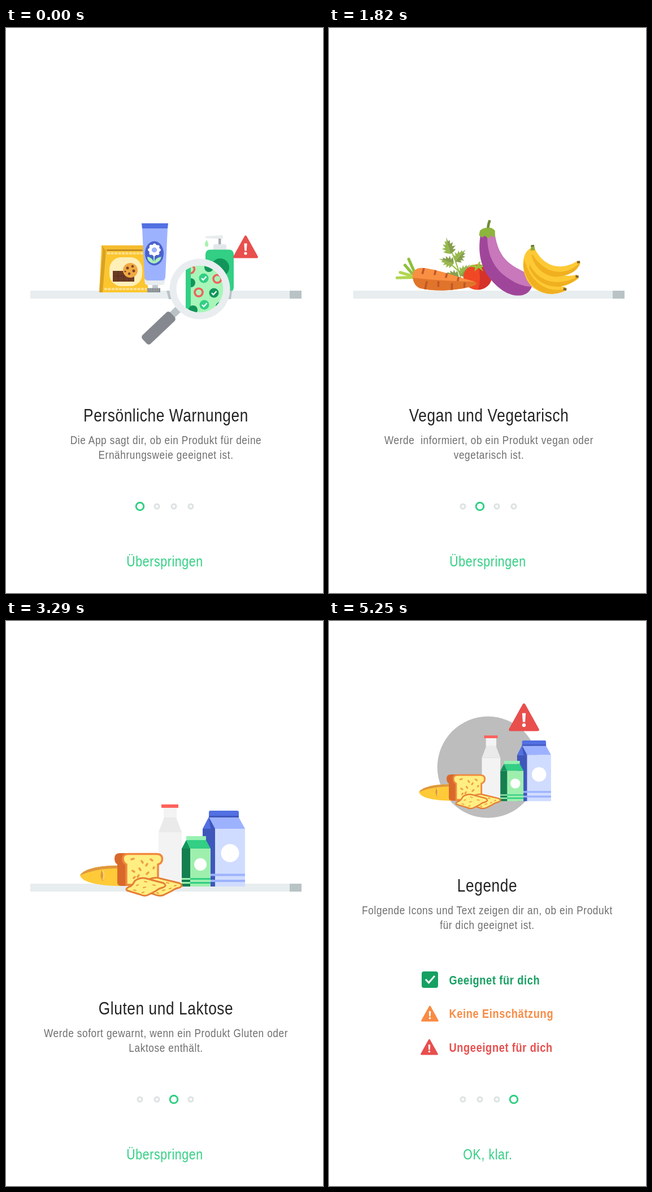
Recreate the animation shown at these times as an HTML page. Size 561 by 998 pixels, loop 6720 ms.

```html
<!DOCTYPE html>
<html lang="de">
<head>
<meta charset="utf-8">
<style>
html, body { margin: 0; width: 100%; height: 100%; overflow: hidden; background: #fff }
svg { display: block; width: 100%; height: 100% }
text { font-family: "Liberation Sans", Arial, sans-serif; white-space: pre; letter-spacing: .75px }
</style>
</head>
<body>
<svg viewBox="0 0 561 998">
<defs>
  <g id="warn">
    <path d="M0-18L20 18H-20Z" fill="currentColor" stroke="currentColor" stroke-width="4" stroke-linejoin="round"/>
    <path d="M-2.6-6H2.6L1.7 7H-1.7Z" fill="#fff"/><circle cy="11.5" r="2.6" fill="#fff"/>
  </g>
  <path id="half" d="M0 0C-4-2-8-3-11-6L-6-7.500L-12-12L-6-12.500L-9-19L-4-17L-4.500-24L-1.500-22L0-30Z"/>
  <g id="leaf"><use href="#half" fill="#96b84c"/><use href="#half" fill="#869f4c" transform="scale(-1 1)"/></g>
  <g id="tick"><circle r="8.5" fill="currentColor"/><path d="M-4 0L-1 3L4.5-3" fill="none" stroke="#fff" stroke-width="2.4"/></g>
  <circle id="ring" r="7" fill="none" stroke="#f2605a" stroke-width="3.6"/>
  <clipPath id="lens"><circle cx="343" cy="461" r="41.5"/></clipPath>
  <clipPath id="tomato"><ellipse cx="276.5" cy="440" rx="24.5" ry="22"/></clipPath>
  <clipPath id="carrot"><path id="carrotShape" d="M162 438C161 427 170 420 182 423C207 427 242 443 267 451Q274 455 268 458C242 465 200 466 173 457Q163 452 162 438Z"/></clipPath>
  <clipPath id="plant"><path id="plantShape" d="M287 360C279 395 283 428 316 457C332 471 354 475 365 464C375 455 373 441 361 432C340 419 315 410 311 360Z"/></clipPath>
</defs>

<g id="shelf"><path d="M43 464H503V478H43Z" fill="#e8edef"/><path d="M502 464H523V478H502Z" fill="#b9c3c6"/></g>

<!-- data-m: slide, pivot x, pivot y, travel x, travel y, turn -->
<g data-m="0 208 426 440 93 60">
  <path d="M169 384H244L252 467H165Z" fill="#fcc62f"/>
  <path d="M169 384L177 393L171 467H165L171 392Z" fill="#d9a224"/>
  <path d="M169 384H243V391H175Z" fill="#f5bc2e"/>
  <path d="M178 392.5H242" stroke="#a87420" stroke-width="2"/>
  <path d="M179 398H243M174 461H249" stroke="#ffe08a" stroke-width="4" stroke-dasharray="5 1.5"/>
  <rect x="183" y="405" width="58" height="51" rx="21" fill="#ffefb8"/>
  <rect x="189" y="429" width="38" height="19" fill="#6b3a24"/>
  <path d="M189 438.5H227M198.5 429V448M208 429V448M217.5 429V448" stroke="#5a2f1e"/>
  <circle cx="220" cy="428" r="13" fill="#f0a844"/>
  <g fill="#7a4526"><circle cx="215" cy="424" r="2.5"/><circle cx="224" cy="421" r="2.2"/><circle cx="226" cy="429" r="2.5"/><circle cx="218" cy="434" r="2.2"/><circle cx="211" cy="430" r="1.5"/></g>
</g>
<g data-m="0 263 404 487 65 100">
  <path d="M259 453H269V461H259Z" fill="#c3cacd"/>
  <path d="M250 459.5H273V467H250Z" fill="#858a90"/><path d="M251 463.3H272" stroke="#a9aeb3" stroke-width="7" stroke-dasharray="1 2"/>
  <path d="M245 444H282L280 452Q279 454 277 454H250Q247 454 246 451Z" fill="#e9edf0"/>
  <path d="M241 353H286L282 440Q281 446 276 446H251Q246 446 245 440Z" fill="#9db2ff"/>
  <path d="M240 345H287L286 354H241Z" fill="#5270e2"/>
  <ellipse cx="262.5" cy="398" rx="16.5" ry="21.5" fill="#4a62cc"/>
  <path d="M262 398V416" stroke="#a9f0b8" stroke-width="2"/>
  <path d="M262 416Q250 414 250 404Q260 405 262 416Q264 405 275 404Q273 414 262 416Z" fill="#a9f0b8"/>
  <g fill="none" stroke="#fff"><circle cx="262.5" cy="392" r="7" stroke-width="5.5"/><circle cx="262.5" cy="392" r="9" stroke-width="5" stroke-linecap="round" stroke-dasharray=".1 6.97"/></g>
  <circle cx="262.5" cy="392" r="4.2" fill="#9db2ff"/>
</g>
<g data-m="0 378 418 542 24 67">
  <path d="M376 371H380.5V384H376Z" fill="#a5acb0"/>
  <path d="M353 368L382 366Q384 366 384 372H371L353 371Z" fill="#e8ecee"/>
  <path d="M367 392V385Q367 382 370 382H387Q390 382 390 385V392Z" fill="#e3e7e9"/>
  <path d="M355 374Q359 381 358 384Q355 390 352 384Q351 381 355 374Z" fill="#a6f2b0"/>
  <rect x="353" y="391.5" width="50" height="75" rx="8" fill="#32cf84"/>
  <circle cx="379" cy="423" r="16" fill="#12955a"/>
</g>
<g data-m="0 424 387 645 -25 210"><use href="#warn" transform="translate(424 386.5)" color="#e84f4d"/></g>
<g data-m="0 343 461 548 -45 65">
  <path d="M309 493L293 508" stroke="#b9c3c6" stroke-width="13"/>
  <rect x="-34" y="-10.5" width="68" height="21" rx="5" fill="#85888f" transform="translate(270 530) rotate(-43.5)"/>
  <path d="M284 464H293V479H288ZM393 464H400L398 479H393Z" fill="#b9c3c6"/>
  <circle cx="343" cy="461" r="53.5" fill="#e9edf0"/>
  <circle cx="343" cy="461" r="41.5" fill="#fff"/>
  <g clip-path="url(#lens)">
    <path d="M318 415H390V508H318Z" fill="#a8f5b9"/><path d="M318 415H327V508H318Z" fill="#32cf84"/>
    <g fill="#12955a"><circle cx="359" cy="423" r="8"/><circle cx="331" cy="498" r="8"/><circle cx="379" cy="492" r="8"/><path d="M327 442A8 8 0 0 1 327 458Z"/></g>
    <use href="#tick" x="350" y="442" color="#32cf84"/><use href="#tick" x="368" y="468" color="#12955a"/><use href="#tick" x="351" y="489" color="#32cf84"/>
    <use href="#ring" x="341" y="467"/><use href="#ring" x="374" y="443"/><path d="M327 420Q335 421 333 428Q331 433 327 433" fill="none" stroke="#f2605a" stroke-width="3.6"/>
  </g>
</g>

<g data-m="1 234 408 467 30 230">
  <path d="M243 447Q238 410 226 378M239 428L220 407M236 414L249 401M242 442L222 433M241 436L254 427" fill="none" stroke="#9bc043" stroke-width="2"/>
  <use href="#leaf" transform="translate(229 398) rotate(-8)"/>
  <use href="#leaf" transform="translate(233 415) rotate(-66) scale(.9)"/><use href="#leaf" transform="translate(236 411) rotate(48) scale(.9)"/>
  <use href="#leaf" transform="translate(239 439) rotate(-72) scale(.9)"/><use href="#leaf" transform="translate(241 437) rotate(48) scale(.9)"/>
</g>
<g data-m="1 276 440 497 0 100">
  <g clip-path="url(#tomato)"><path d="M250 415H303V465H250Z" fill="#f04825"/><path d="M278 415Q284 440 276 464H305V415Z" fill="#d5322a"/></g>
  <path d="M262 421Q270 416 277 420Q280 412 283 414L281 420Q290 417 293 424Q287 422 284 424L287 431L279 424L272 430L273 423Z" fill="#9cc33b"/>
</g>
<g data-m="1 205 444 455 5 126">
  <g fill="none" stroke-width="5" stroke-linecap="round" stroke="#8fbf3f"><path d="M168 435L157 406M166 437L150 416"/><path d="M166 437L141 428M167 438L135 437" stroke="#b2d650"/></g>
  <use href="#carrotShape" fill="#f98f42"/>
  <g clip-path="url(#carrot)"><path d="M160 438Q215 448 275 452V470H160Z" fill="#e0742b"/>
  <path d="M183 421L179 433M203 425L200 436M222 433L219 442M242 440L239 449M186 446L182 460M206 447L205 457M229 452L228 465M251 452L250 461" stroke="#c0562a" stroke-width="3.5"/></g>
</g>
<g data-m="1 328 406 550 65 110">
  <use href="#plantShape" fill="#a0469a"/>
  <g clip-path="url(#plant)"><path d="M299 355C294 397 307 423 331 440Q351 456 375 457L380 420L315 355Z" fill="#c878bb"/></g>
  <path d="M300 354Q300 347 304 338" fill="none" stroke="#708c3a" stroke-width="4.5"/>
  <path d="M286 355Q292 350 299 351Q308 350 312 357L311 369L305 364L300 370L294 364L290 367L284 363Z" fill="#8db53c"/>
</g>
<g data-m="1 408 425 513 20 210">
  <g fill="#fdc935">
    <path d="M376 386C355 392 353 440 377 457C395 471 415 470 430 464L428 458C404 456 391 440 381 386Z"/>
    <path d="M360 415C362 444 380 466 405 468Q420 468 430 464L429 462C395 466 370 445 363 405Z" fill="#f0b020"/>
    <path d="M376 386C360 410 371 439 396 452C416 462 441 455 453 445L450 439C425 444 395 430 381 386Z"/>
    <path d="M370 420C378 444 397 456 420 457Q441 454 453 445L452 443C417 457 383 446 371 413Z" fill="#f0b020"/>
    <path d="M376 386C370 412 388 433 405 437C431 443 452 434 458 420L453 416C430 428 397 426 382 386Z"/>
    <path d="M376 396C377 420 396 436 412 439C436 441 453 433 458 420L457 419C438 437 400 440 378 398Z" fill="#f0b020"/>
  </g>
  <path d="M375 390L377 381L382 381L383 390Z" fill="#92a93a"/><path d="M376.5 382H382" stroke="#5f7030" stroke-width="2.5"/>
  <path d="M453 418L458 418M448 442L453 443M425 461L430 463" stroke="#80602c" stroke-width="4"/>
</g>

<g id="pack">
  <circle id="disc" fill="#bdbdbd" cx="283.5" cy="394"/>
  <g data-m="2 170 450 430 0 120">
    <path d="M131 449C139 436 172 431 204 432V468C170 468 134 463 131 449Z" fill="#ffca38"/>
    <path d="M131 449C139 436 172 431 204 432V437C170 436 148 442 131 449Z" fill="#df983e"/>
    <path d="M169 440Q176 449 171 460Q165 451 169 440Z" fill="#df983e"/><path d="M171 441Q175 449 171 457" fill="none" stroke="#ffe288" stroke-width="1.5"/>
  </g>
  <g data-m="2 290 396 500 0 60">
    <path d="M275 324H305V330H275Z" fill="#ff625b"/><path d="M279 330H302V348H279ZM270 373H311V467H270Z" fill="#f3f3f3"/>
    <path d="M280 347H301L311 373H270Z" fill="#eaeaea"/>
  </g>
  <g data-m="2 386 402 560 0 80">
    <path d="M348 367H371V469H348Z" fill="#3f57bb"/><path d="M370 367H423V469H370Z" fill="#d0dcff"/>
    <path d="M359 347H412L423 367H370Z" fill="#9db2ff"/><path d="M359 346L370 367H348Z" fill="#5270e2"/><path d="M359 347L362 367H370Z" fill="#3f57bb"/>
    <path d="M359 347V338Q359 335 362 335H409Q412 335 412 338V347Z" fill="#5270e2"/><path d="M359 345.5H412" stroke="#3f57bb" stroke-width="3"/>
    <path d="M348 448.5H423M348 459H423" stroke="#9db2ff" stroke-width="4"/><circle cx="396.5" cy="410" r="16" fill="#fff"/>
  </g>
  <g data-m="2 336 425 520 0 100">
    <path d="M311 402H327V469H311Z" fill="#157f50"/><path d="M326 402H362V469H326Z" fill="#9eefae"/>
    <path d="M319 387H354L362 402H326Z" fill="#32cf84"/><path d="M319 387L326 402H311Z" fill="#12955a"/>
    <rect x="319" y="380" width="35" height="7" rx="1" fill="#96f2b2"/>
    <path d="M326 455.5H362M326 462.5H362" stroke="#32cf84" stroke-width="3"/><path d="M311 455.5H326M311 462.5H326" stroke="#9eefae" stroke-width="3"/>
    <circle cx="344" cy="430" r="11" fill="#fff"/>
  </g>
  <g data-m="2 235 438 470 0 80">
    <path d="M202 410H225V468H205Q197 468 197 462V430Q192 427 192 419Q192 410 202 410Z" fill="#d9692b"/>
    <path d="M216 411.5H267Q276.500 412 276.500 420Q276.500 428 269 430V466H213V430Q207 427 207 419Q207 412 216 411.5Z" fill="#ffee82" stroke="#f0883e" stroke-width="3.5"/>
    <path d="M222 421l4-1M240 424l2 3M256 421l3 2M224 441l3 2M236 437l2 3M248 432l2-3M262 435l-1 2M226 454l2-2M249 447l3-3M235 449l-2 3" stroke="#ee9f40" stroke-width="3.5" stroke-linecap="round"/>
  </g>
  <g data-m="2 262 470 500 0 90">
    <g fill="#ffee82" stroke="#e57e35" stroke-width="3" stroke-linejoin="round">
      <path d="M250 458Q262 451 274 455L307 463Q315 467 307 471Q300 472 293 477L279 484Q271 487 263 483L248 478Z"/>
      <path d="M228 459Q238 452 249 455L279 463Q286 468 277 471Q271 472 265 477L251 484Q245 487 237 483L214 476Q211 473 217 470Q223 469 228 459Z"/>
    </g>
    <path d="M231 467l3-1M245 460l4 1M260 466l4 1M226 475l4 1M243 471l4-1M241 480l3-1M284 462l4 1M298 468l3-1M277 476l4-1M267 480l3 1M289 473l3-1" stroke="#ee9f40" stroke-width="2.2" stroke-linecap="round"/>
  </g>
</g>
<use id="alert" href="#warn" color="#e84f4d"/>

<g id="copy"></g>
<g id="key">
  <rect x="164" y="619" width="29" height="29" rx="4" fill="#16a062"/><path d="M171 633L176.5 639L187 627" fill="none" stroke="#fff" stroke-width="3"/>
  <use href="#warn" transform="translate(178.5 693.5) scale(.7)" color="#f98b44"/><use href="#warn" transform="translate(177.5 752.5) scale(.7)" color="#e84f4d"/>
</g>
<g id="dots"></g>
</svg>
<script>
const LOOP = 6720, STEP = 70, STARTS = [1156, 2633, 4572], GREEN = '#32cf84';
const $ = id => document.getElementById(id);

// One condensed face for all text
const text = (x, y, size, fill, str, extra = 'text-anchor="middle"') =>
  `<text transform="translate(${x} ${y}) scale(.82 1)" font-size="${size}" fill="${fill}" ${extra}>${str}</text>`;

const slides = [
  ['Persönliche Warnungen', 'Die App sagt dir, ob ein Produkt für deine', 'Ernährungsweie geeignet ist.'],
  ['Vegan und Vegetarisch', 'Werde  informiert, ob ein Produkt vegan oder', 'vegetarisch ist.'],
  ['Gluten und Laktose', 'Werde sofort gewarnt, wenn ein Produkt Gluten oder', 'Laktose enthält.'],
  ['Legende', 'Folgende Icons und Text zeigen dir an, ob ein Produkt', 'für dich geeignet ist.']
];
$('copy').innerHTML = slides.map(([title, a, b], i) => {
  const x = i < 3 ? 283 : 280, y = i < 3 ? 695 : 478;
  return `<g>${text(x, y, 32, '#222', title)}</g>
    <g>${text(x, y + 40, 21, '#6e6e6e', a)}${text(x, y + 65.5, 21, '#6e6e6e', b)}</g>`;
}).join('') +
  `<g>${text(281, 951, 26, GREEN, 'Überspringen')}</g><g>${text(281, 951, 26, GREEN, 'OK, klar.')}</g>`;
const copy = [...$('copy').children];

$('key').innerHTML += [['Geeignet für dich', '#16a062'], ['Keine Einschätzung', '#f98b44'], ['Ungeeignet für dich', '#e84f4d']]
  .map(([s, c], i) => text(212.5, 642 + 59.3 * i, 22.3, c, s, 'font-weight="bold"')).join('');

$('dots').innerHTML = slides.map((_, i) => `<g transform="translate(${237 + 30 * i} 845)" fill="none" stroke-width="3">
  <circle r="4" stroke="#dde2e3"/><circle r="6.8" stroke="${GREEN}"/></g>`).join('');
const dots = [...$('dots').children];

const items = [...document.querySelectorAll('[data-m]')].map(el => [el, ...el.dataset.m.split(' ').map(Number)]);

const spring = ms => {
  if (ms <= 0) return 0;
  if (ms > 650) return 1;
  const x = ms * .01423;
  return 1 - (1 + x) * Math.exp(-x);
};
const visible = d => Math.max(0, 1 - 1.85 * Math.abs(d));

function draw(now) {
  const t = Math.floor(now % LOOP / STEP) * STEP;
  const [p, q, r] = STARTS.map(s => spring(t - s));
  const offset = [-p, 1 - p - q, 1 - q - r, 1 - r];

  for (const [el, slide, x, y, dx, dy, turn] of items) {
    const d = slide === 2 ? 1 - q : offset[slide];
    // The vegetables are drawn in a pose just short of rest
    const rest = slide === 1 ? .0275 : 0, e = d - rest;
    const scale = (1 - .89 * Math.abs(d)) / (1 - .89 * rest);
    el.setAttribute('transform', `translate(${x + dx * e} ${y + dy * Math.abs(e)}) rotate(${turn * e}) scale(${scale}) translate(${-x} ${-y})`);
    el.style.display = Math.abs(d) < 1 ? '' : 'none';
  }

  offset.forEach((d, i) => {
    const move = i < 3 ? d * 600 : 0, a = visible(d);
    copy[2 * i].setAttribute('transform', `translate(${move} 0)`);
    copy[2 * i + 1].setAttribute('transform', `translate(${move * .85} 0)`);
    copy[2 * i].style.opacity = copy[2 * i + 1].style.opacity = a;
    dots[i].children[0].style.opacity = 1 - a;
    dots[i].children[1].style.opacity = a;
  });
  copy[8].style.opacity = 1 - r;
  copy[9].style.opacity = $('key').style.opacity = visible(1 - r);

  $('shelf').setAttribute('transform', `translate(${283.5 * .88 * r} 0) scale(${1 - .88 * r} 1)`);
  $('shelf').style.opacity = r < .5 ? 1 : 2 - 2 * r;
  $('pack').setAttribute('transform', `translate(${54.5 * r} ${-57 * r}) scale(${1 - .2 * r})`);
  $('disc').setAttribute('r', 112 * r);
  const grow = 1.22 * Math.max(0, (r - .3) / .7);
  $('alert').setAttribute('transform', `translate(345 ${170 + 150 * (1 - r)}) scale(${grow})`);
}

const begin = performance.now();
(function tick() {
  draw(performance.now() - begin);
  requestAnimationFrame(tick);
})();
</script>
</body>
</html>
```
